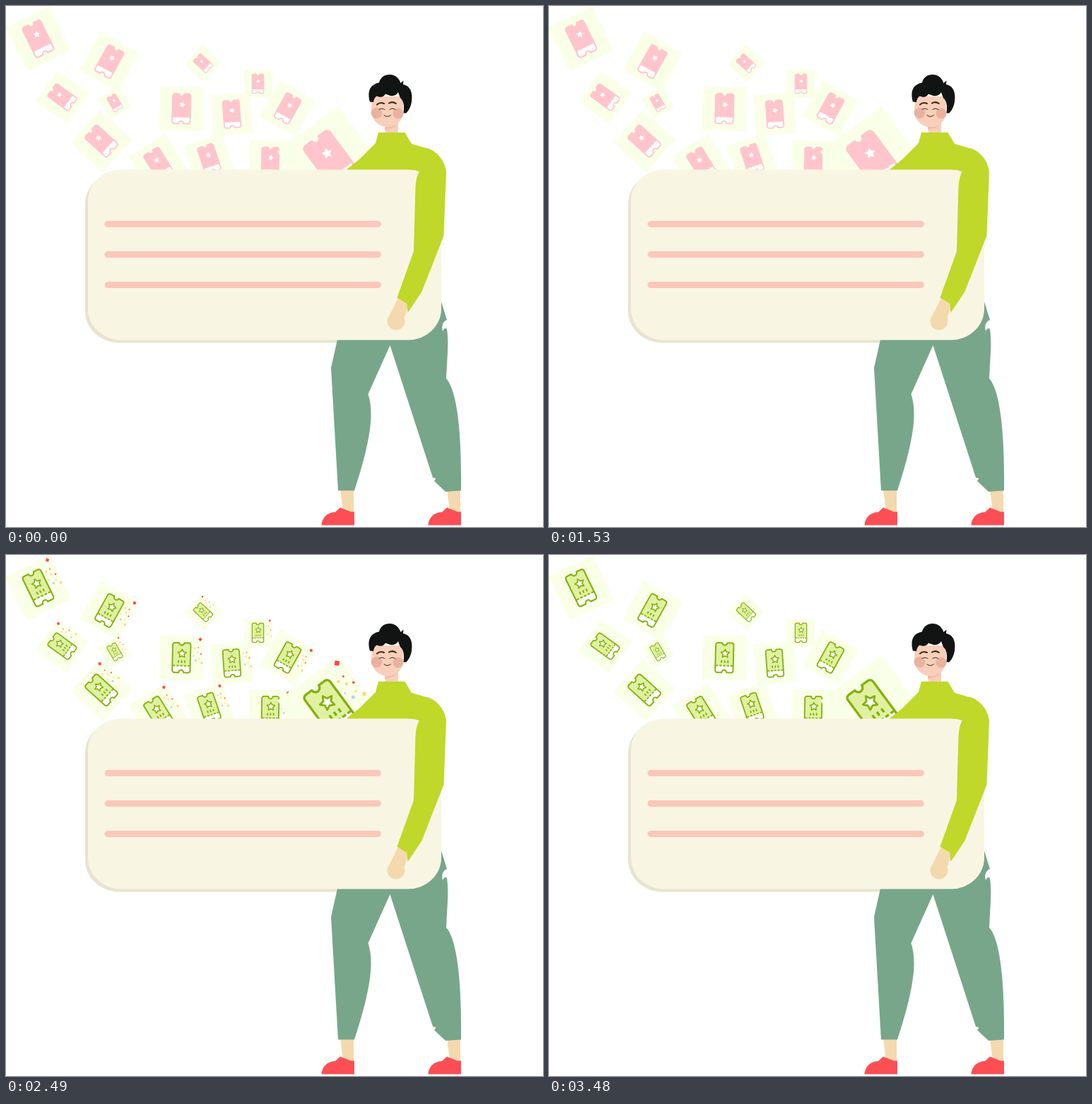
Animation, 760 px wide and 737 px high, one loop 9.6 s. Source, as an HTML page:

```html
<!DOCTYPE html>
<html lang="en">
<head>
<meta charset="utf-8">
<title>Ticket box</title>
<style>
html, body { margin: 0; height: 100%; overflow: hidden; background: #fff; }
svg { display: block; width: 760px; height: 737px; --line: #82b10b; --fill: #e1f0a0; }
svg.pink { --line: #ffc5cc; --fill: #ffc5cc; }
.fill { fill: var(--fill); }
.line { fill: none; stroke: var(--line); stroke-width: 1.9; stroke-linejoin: round; }
.star { fill: #fff; stroke: var(--line); stroke-width: 1.6; stroke-linejoin: round; }
</style>
</head>
<body>
<svg id="stage" viewBox="0 0 760 737">
  <defs>
    <path id="body" d="M-9.700-21H-3.500a3.500 3.500 0 0 0 7 0H9.700a3 3 0 0 1 3 3V18a3 3 0 0 1-3 3H3.500a3.500 3.500 0 0 0-7 0H-9.700a3 3 0 0 1-3-3V-18a3 3 0 0 1 3-3Z"/>
    <g id="ticket">
      <rect x="-31" y="-31" width="62" height="62" fill="#faffe8"/>
      <g id="confetti"></g>
      <g id="face">
        <use href="#body" class="fill"/>
        <path fill="#fff" d="M-12.700 11.500H12.700V18a3 3 0 0 1-3 3H3.500a3.500 3.500 0 0 0-7 0H-9.700a3 3 0 0 1-3-3Z"/>
        <use href="#body" class="line"/>
        <path id="tear" class="line" d="M-12 11.300H12"/>
        <path class="line" d="M-4 3.700v3.600M.5 3.700v3.600M5 3.700v3.600"/>
        <path id="star" class="star"/>
      </g>
    </g>
    <g id="foot">
      <path fill="#f4d9ae" d="M473 684H492V718L477 714Z"/>
      <path fill="#fb4f55" d="M446.500 734.500C447 724 455 716 466 716L473 709.500L488 715.500H493V734.500Z"/>
    </g>
  </defs>

  <g id="tickets"></g>
  <rect x="112" y="235" width="500" height="241.500" rx="48" ry="45" fill="#e9e4cf"/>

  <use href="#foot"/>
  <use href="#foot" x="151"/>
  <path fill="#78a68a" d="M460 512L469 472L480 440H600L615 415L624 444Q615 448 618 460Q621 454 624 457Q626 470 625 490L623 527C640 545 645 615 644 685.500L622 687L606 672L608.500 668.500L604 667L543.500 480L512.500 549C521 575 517 612 493 685.500H470Z"/>

  <path fill="#f8cfba" d="M536 166L555 162V181H537Z"/>
  <path fill="#efbfa8" d="M536 168L555 164Q552 173 536 175Z"/>
  <path fill="#bfd829" d="M481 232L500 217L523 194L527 179H564.500L574 195L598 202L600 250H481Z"/>

  <path fill="#f8cfba" d="M518 128H562V148C562 163 552 171 540 171C527 171 518 162 517 148Z"/>
  <g fill="#e9b29f"><circle cx="524.500" cy="151.500" r="7.800"/><circle cx="555" cy="152" r="7.500"/></g>
  <g fill="none" stroke="#3a2a16" stroke-linecap="round">
    <path stroke-width="2" d="M525 139.500Q529 135.500 535 138M542 137.500Q547 134.500 552 138"/>
    <path d="M528 146.500Q532 143.500 536 146.500M543 146.500Q547 143.500 551 146.500M535 154.500Q539.500 158.500 544.500 154.500"/>
  </g>
  <path fill="#111413" d="M515 135.500C511 121 515 111 528 108.500C531 96 546 94 554 101.500Q557.500 105 558.500 109L562.500 105.500L562 111C573 113 576 124 574 136Q572 146 566.500 151.500H562.500C564 142 563 134 558 130L555 122Q552 128 544 127L537 124.500Q533 131 525 127.500Q521 129 520 136Z"/>

  <rect x="116" y="231.500" width="500" height="241" rx="47" ry="44" fill="#f9f5e3"/>
  <path stroke="#fbc7bb" stroke-width="9" stroke-linecap="round" d="M144 308.500H526.500M144 351.500H526.500M144 394.500H526.500"/>

  <path fill="#f4d9ae" d="M556 411L571 419L563 443L543 437Z"/>
  <circle cx="552" cy="446" r="12.500" fill="#f4d9ae"/>
  <path fill="#bfd829" d="M585 234L580 215L596 201C612 206 622 221 623 235L619.500 325L588.500 404L568.500 434L567.500 421L553.500 412.500L577 347L579.500 256Q580.500 241 585 234Z"/>
</svg>

<script>
const $ = id => document.getElementById(id);
const LOOP = 9600, GREEN = 2040, CONFETTI = 1440;

// centre x, centre y, side, rotation
const tickets = [
  [45.5, 46.5, 69, -26], [146.3, 78.5, 62, 29], [79.5, 129, 54, -54],
  [135, 191, 62, -48], [154, 137, 34, -30], [279, 81, 37, -47],
  [248.3, 145.3, 62, 1.5], [319.5, 153, 57, -4], [356.5, 110, 40, 0],
  [398.5, 145, 58, 29], [215.5, 223, 61, -32], [287.5, 216, 57, -18.5],
  [374, 220, 59, 1], [459.5, 217.3, 108, -36.5]
];
$('tickets').innerHTML = tickets.map(([x, y, size, turn]) =>
  `<use href="#ticket" transform="translate(${x} ${y}) rotate(${turn}) scale(${size / 62})"/>`).join('');

// final x, final y, size, colour
const red = '#fb4350', yellow = '#ffd67a', blue = '#a9dbe0';
const bits = [
  [26.3, -26.8, 3.4, red], [27.8, -6.1, 1.6, red], [29.2, 6.8, 2.6, yellow],
  [20.4, 3.4, 2.3, blue], [18.4, -14, 1.9, yellow], [22.5, -8.5, 1.9, yellow],
  [24, -15, 1.3, red], [17, -3, 1.3, blue], [25, 1, 1.5, yellow]
];
$('confetti').innerHTML = bits.map(([, , size, colour]) =>
  `<rect x="${-size / 2}" y="${-size / 2}" width="${size}" height="${size}" fill="${colour}"/>`).join('');
const pieces = [...$('confetti').children];

$('star').setAttribute('d', 'M' + Array.from({ length: 10 }, (_, i) => {
  const r = i % 2 ? 3.2 : 6.2, a = i * Math.PI / 5;
  return `${(r * Math.sin(a)).toFixed(2)} ${(-r * Math.cos(a)).toFixed(2)}`;
}).join('L') + 'Z');

const clamp = v => Math.min(1, Math.max(0, v));

function draw(t) {
  const pink = t < GREEN;
  $('stage').classList.toggle('pink', pink);

  const lift = t < 1040 ? Math.sin(Math.PI * t / 1040) : 0;
  $('face').setAttribute('transform', `translate(${-0.5 * lift} ${-lift})`);
  const spin = pink ? 18 + t * 198 / GREEN : 0;
  $('star').setAttribute('transform', `translate(.8 -5.800) rotate(${spin})`);
  const gap = 1.8 * clamp((t - 650) / 350);
  $('tear').setAttribute('stroke-dasharray', gap ? `3.4 ${gap}` : 'none');

  const u = t - GREEN, show = u > 0 && u < CONFETTI;
  $('confetti').setAttribute('visibility', show ? 'visible' : 'hidden');
  if (!show) return;
  const out = 1 - Math.exp(-u / 95);
  const scale = 1.15 * (1 - (u / CONFETTI) ** 3);
  pieces.forEach((piece, i) => {
    const [x, y] = bits[i];
    piece.setAttribute('transform',
      `translate(${x * out} ${-4 + (y + 4) * out}) rotate(${40 + u * 0.012}) scale(${scale})`);
  });
}

const start = performance.now();
function tick() {
  draw((performance.now() - start) % LOOP);
  requestAnimationFrame(tick);
}
tick();
</script>
</body>
</html>
```
